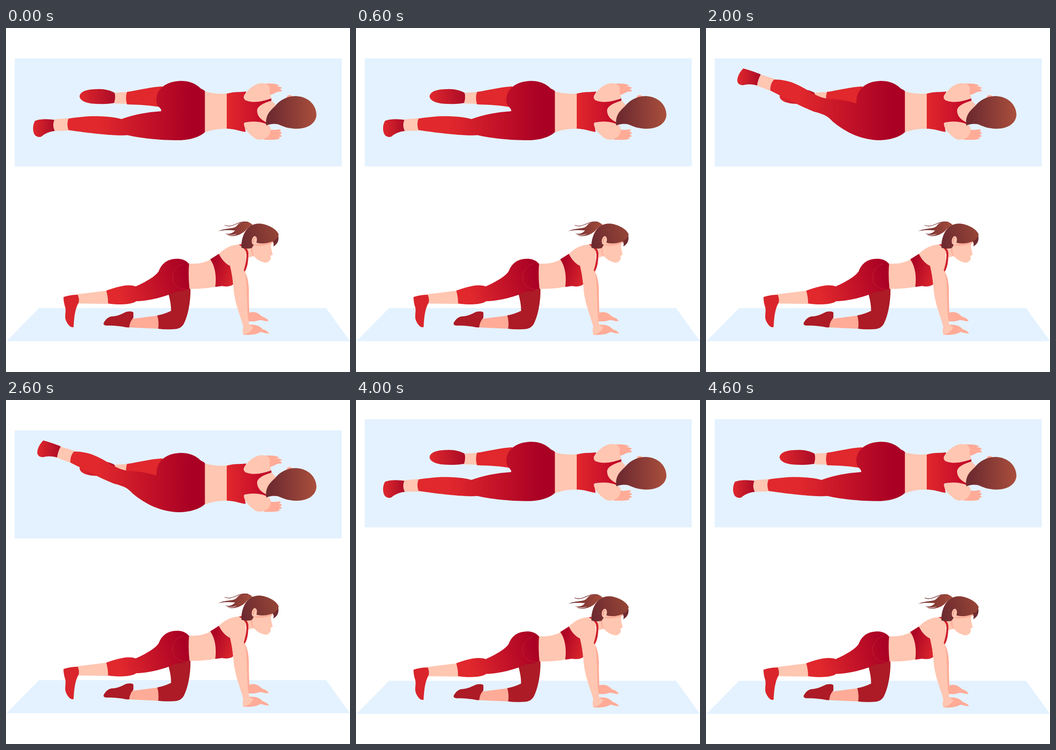
Recreate the animation shown at these times as an HTML page. Size 748x748 px, loop 5 s.

```html
<!DOCTYPE html>
<html lang="en">
<head>
<meta charset="utf-8">
<title>Leg raises</title>
<style>
html, body { margin: 0; width: 100%; height: 100%; overflow: hidden; background: #fff; }
svg { display: block; width: 100%; height: 100%; }
.mat { fill: #e4f2ff; }
.skin { fill: #ffc6b1; }
.shade { fill: #ffab97; }
.dark { fill: #ac1b26; }
.line { fill: none; stroke-linecap: round; }
</style>
</head>
<body>
<svg viewBox="0 0 748 748">
  <defs>
    <linearGradient id="topLeg" gradientUnits="userSpaceOnUse" x1="200" y1="0" x2="405" y2="0">
      <stop stop-color="#e1282d"/><stop offset="1" stop-color="#a90024"/>
    </linearGradient>
    <linearGradient id="shoe">
      <stop stop-color="#e0282d"/><stop offset="1" stop-color="#ab0b26"/>
    </linearGradient>
    <linearGradient id="topBra">
      <stop stop-color="#e1282d"/><stop offset="1" stop-color="#bd0428"/>
    </linearGradient>
    <linearGradient id="topHair">
      <stop offset=".1" stop-color="#6f2b30"/><stop offset="1" stop-color="#aa4f3d"/>
    </linearGradient>
    <linearGradient id="sideLeg" gradientUnits="userSpaceOnUse" x1="245" y1="575" x2="392" y2="535">
      <stop stop-color="#e1282d"/><stop offset="1" stop-color="#a90024"/>
    </linearGradient>
    <linearGradient id="raisedLeg" gradientUnits="userSpaceOnUse" x1="215" y1="500" x2="385" y2="540">
      <stop stop-color="#df272d"/><stop offset="1" stop-color="#a90024"/>
    </linearGradient>
    <linearGradient id="sideBra" x1="0" y1=".3" x2="1" y2=".8">
      <stop offset=".1" stop-color="#ad0425"/><stop offset="1" stop-color="#da262c"/>
    </linearGradient>
    <linearGradient id="sideHair" x1="0" y1=".6" x2="1" y2=".4">
      <stop stop-color="#6d2a30"/><stop offset="1" stop-color="#964536"/>
    </linearGradient>
    <linearGradient id="tail">
      <stop stop-color="#6d2a30"/><stop offset="1" stop-color="#a44c3b"/>
    </linearGradient>
  </defs>

  <g id="topView">
    <path class="mat" d="M19 66H730V301H19Z"/>
    <path class="skin" d="M234 141L264 139V165L234 164Z"/>
    <path fill="url(#shoe)" d="M236 141C226 135 211 132 198 133C178 133 161 137 160 149C162 161 181 165 200 165C215 166 230 164 235 163Q239 151 236 141Z"/>
    <path fill="#e0282d" d="M263 139C290 135 315 128 340 127V173C316 168 290 167 263 166Q259 152 263 139Z"/>

    <g id="straight">
      <path class="skin" d="M101 199L138 196V223L101 224Z"/>
      <path fill="url(#shoe)" d="M105 200C95 198 75 197 63 202C57 212 58 227 63 233C67 237 73 238 77 236C85 229 95 225 106 224Q100 212 105 200Z"/>
      <path fill="url(#topLeg)" d="M327 158C326 135 345 116 380 115C405 115 418 126 424 132Q430 134 433 138V226C425 234 405 244 375 244C330 244 290 239 264 233C240 235 190 230 136 222Q131 209 136 197C160 193 185 191 205 192Q234 193 251 198C275 189 305 183 337 181C339 178 335 174 332 171Q327 166 327 158Z"/>
    </g>

    <g id="crossed">
      <path class="skin" d="M118 101L150 111L141 137L110 125Z"/>
      <path fill="url(#shoe)" d="M119 101C108 96 90 90 81 88C74 95 68 105 68 115C69 122 75 125 82 124C95 121 103 123 111 125Q113 112 119 101Z"/>
      <path fill="url(#topLeg)" d="M327 164C326 135 345 116 380 115C405 115 418 126 424 132Q430 134 433 138V226C425 234 405 244 375 244C340 243 306 229 275 203C264 191 255 187 235 182C200 168 170 151 140 136Q139 121 148 112C165 112 182 115 200 124C225 136 237 149 264 154Q298 155 327 164Z"/>
    </g>

    <path class="skin" d="M432.5 138Q458 145 482 142V219Q455 218 432.5 227Z"/>
    <path class="shade" d="M610 150Q613 145 619 146L624 149L616 154ZM562 121C575 120 590 121 594 125L588 127Q598 127 600 131L594 133Q601 134 599 138Q589 138 584 142L574 146ZM569 228L576 221C586 223 593 219 597 221Q599 224 592 226Q601 225 599 230L594 232Q601 233 599 236L592 238Q597 239 594 241C586 244 574 243 560 243Z"/>
    <path class="skin" d="M575 155L589 170L568 208C553 202 545 192 545 181C546 169 560 162 575 155Z"/>
    <path fill="url(#topBra)" d="M480 143C495 138 510 140 522 138L520 157C540 163 559 159 577 153V158C560 163 546 170 546 180C546 192 556 201 568 206V213C550 203 530 203 518 206L521 226C507 224 495 219 480 219Z"/>
    <path class="skin" d="M517 148C524 135 540 121 555 120C569 120 573 125 574 132Q572 142 577 152C560 160 540 163 526 159Q515 156 517 148ZM517 208C528 202 550 202 567 209C578 214 578 225 570 236C560 244 548 245 540 239C530 231 518 221 517 208Z"/>
    <path fill="url(#topHair)" d="M566 212C563 191 573 181 585 170C595 157 611 148 630 148C658 149 675 168 675 189C674 208 655 219 633 219C610 219 600 212 590 209Q577 207 566 212Z"/>
  </g>

  <g id="sideView">
    <path class="mat" d="M72 609H696L748 681H1Z"/>
    <path class="shade" d="M270 633L332 625V654L266 651Z"/>
    <path class="dark" d="M213 640C218 632 224 627 232 627C246 626 254 620 262 617Q275 615 277 619V630Q269 638 268 651H262C250 648 232 647 218 647Q210 646 213 640Z"/>
    <path class="dark" d="M349 562L401 565C402 590 397 620 389 638C384 651 376 655 362 655Q345 656 331 654Q333 639 329 625Q345 622 359 615C359 595 354 582 349 562Z"/>
    <path class="skin" d="M397 512Q423 515 446 503C460 525 464 545 458 562Q434 568 397 567Z"/>

    <g id="lowered">
      <path class="skin" d="M155 579L220 571L223 600L155 599Z"/>
      <path fill="#d9252b" d="M125 585Q140 580 156 580Q160 589 158 597C150 610 148 630 147 650C141 653 134 645 130 635C127 627 131 616 129 608Q125 596 125 585Z"/>
      <path fill="url(#sideLeg)" d="M398 513C390 503 378 501 368 502C350 503 338 513 332 529C325 540 304 552 282 562C265 556 244 562 218 571Q222 585 222 599C246 603 275 601 283 594C310 594 348 584 370 573Q389 572 399 567Q396 541 398 513Z"/>
    </g>

    <g id="raised" transform="translate(.9 -2)">
      <path class="skin" d="M153 460L216 483L206 511L148 480Z"/>
      <path fill="#de272c" d="M130 449Q143 454 155 459Q152 469 149 480C139 488 129 504 115 516C109 518 106 512 106 505C109 495 118 485 119 472C119 462 124 452 130 449Z"/>
      <path fill="url(#raisedLeg)" d="M398 517C391 502 375 495 358 495C340 496 330 503 322 509C305 510 290 508 273 506C255 495 235 486 213 483Q206 495 203 509C218 521 240 531 262 533C278 538 292 549 320 557C345 564 372 569 399 570Q396 544 398 517Z"/>
    </g>

    <path class="line" stroke="#cb3541" stroke-width=".9" stroke-dasharray="2 2" d="M385 513C369 517 362 531 362 544C363 559 375 569 397 569"/>
    <path class="shade" d="M518 528C526 539 529 560 528 582L529 619C540 616 548 619 556 627Q568 631 571 637C566 639 558 635 553 635L540 638H524Z"/>
    <path class="skin" d="M509 471L535 468L544 496Q536 496 527 499Z"/>
    <path class="skin" d="M534 468L579 458Q575 473 577 481L580 493Q576 494 575 497L576 502C572 508 569 511 562 510C552 507 540 502 536 489Z"/>
    <path class="shade" d="M537 473Q533 485 540 497Q532 492 533 476ZM541 470Q568 471 582 462L580 467Q563 475 542 473Z"/>
    <path class="shade" d="M516 650L530 645C545 645 552 648 558 655Q568 658 572 664C566 665 560 662 553 661C545 666 535 668 516 667Z"/>
    <path fill="url(#sideBra)" d="M444 503L463 491L489 515L494 557C490 562 478 563 470 561L455 563C458 540 455 518 444 503Z"/>
    <path class="skin" d="M463 491C479 475 497 470 509 471C522 480 524 495 519 526C524 548 524 580 525 615Q526 632 529 645L538 651Q531 664 516 667Q513 658 516 650C511 630 498 600 495 570C494 548 490 530 487 517C477 513 468 502 463 491Z"/>
    <path fill="#d0202a" d="M506 471L511 470Q526 478 527 489C527 508 525 521 519 530L517 527C522 511 524 496 522 486Q516 476 506 471Z"/>
    <path fill="url(#tail)" d="M536 428C526 417 508 421 502 430C495 438 478 434 461 442C475 438 490 440 498 440C492 448 483 449 476 446C483 452 496 450 502 447Q495 453 480 450C492 456 511 450 520 441Q526 433 536 428Z"/>
    <path class="line" stroke="#7c3434" stroke-width="1.3" d="M526 422C503 418 494 436 476 429"/>
    <path fill="#702b30" d="M578 461L592 451Q595 468 581 475Q584 468 578 461Z"/>
    <path fill="url(#sideHair)" d="M512 478C511 465 515 451 520 443C528 428 545 422 562 427C580 432 590 441 593 449Q590 461 577 465Q560 471 545 467C542 462 538 476 533 479Q522 481 512 478Z"/>
    <ellipse class="skin" cx="540" cy="462" rx="5.5" ry="9.5" transform="rotate(10 540 462)"/>
    <path class="line" stroke="#f59b87" stroke-width="2" d="M542 457Q537 456 538 466"/>
  </g>
</svg>
<script>
const POSE_TIME = 1000;
const shrunkTop = "translate(.3 -22.3) scale(.9985)";
const shrunkSide = "translate(0 3.3) scale(.9975)";
const poses = [
  { top: "", side: "" },
  { top: shrunkTop, side: shrunkSide, raised: true },
  { top: "", side: "", crossed: true },
  { top: shrunkTop, side: shrunkSide, raised: true },
  { top: "translate(0 -24.2)", side: "translate(0 1.4)" }
];
const part = id => document.getElementById(id);
const show = (id, on) => part(id).setAttribute("display", on ? "inline" : "none");

function draw(time) {
  const pose = poses[Math.floor(time / POSE_TIME) % poses.length];
  part("topView").setAttribute("transform", pose.top);
  part("sideView").setAttribute("transform", pose.side);
  show("straight", !pose.crossed);
  show("crossed", pose.crossed);
  show("lowered", !pose.raised);
  show("raised", pose.raised);
}

const start = performance.now();
function tick() {
  draw(performance.now() - start);
  requestAnimationFrame(tick);
}
tick();
</script>
</body>
</html>
```
